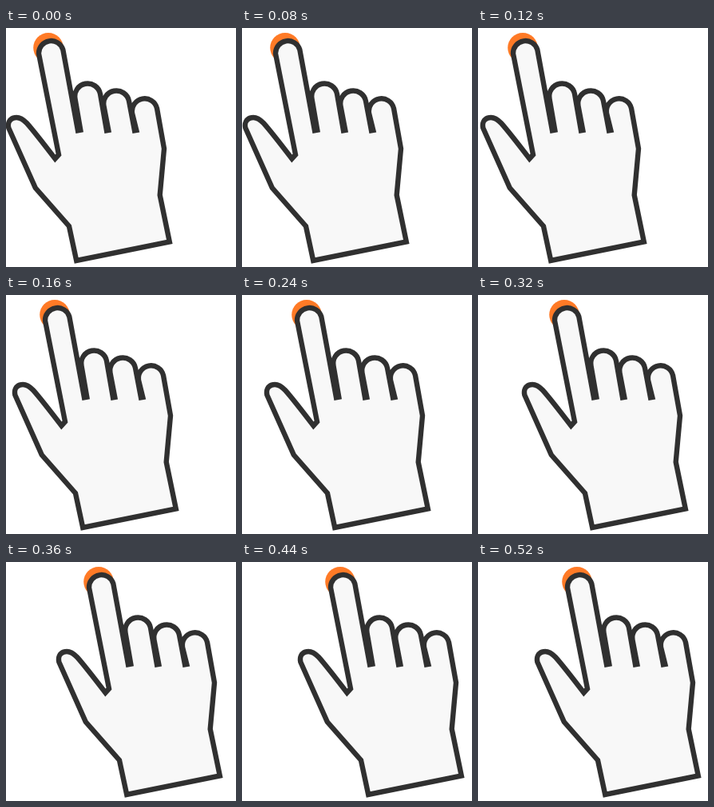
An HTML page for the animation above (560 ms loop, 288 px wide and 299 px high).

```html
<!DOCTYPE html>
<html lang="en">
<head>
<meta charset="utf-8">
<title>Swiping hand</title>
<style>
  html, body { margin: 0; width: 100%; height: 100%; overflow: hidden; background: #fff; }
  svg { display: block; width: 288px; height: 299px; }
  .outline { fill: #f8f8f8; stroke: #303030; stroke-width: 6.4; stroke-linejoin: miter; }
</style>
</head>
<body>
<svg viewBox="0 0 288 299">
  <g id="hand">
    <circle cx="53" cy="24.8" r="18.8" fill="#ff7a26"/>
    <!-- thumb, four fingers, then the palm and wrist -->
    <path class="outline" d="M3.3 125 C0.5 113 14 106 26 119 C35 129 45 142 61.5 163.5 L66 158.5
      L41 32 A15.5 15.5 0 0 1 71.3 27 L90 128.3 L93.3 127.7
      L86.5 88.5 A16 16 0 0 1 118 82.5 L126 128.3 L128.3 127.9
      L122.5 97.5 A16 16 0 0 1 154 91.5 L161 128.3 L163.3 127.9
      L158 106.5 A15.8 15.8 0 0 1 189 100.5
      L198 151 L192.7 209 L204.8 267.5 L88.2 291 L79 248 L36.8 200 Z"/>
  </g>
</svg>
<script>
  const LOOP = 560, STEP = 40, LAST = LOOP / STEP - 1, TRAVEL = 71;
  const hand = document.getElementById('hand');
  const ease = s => s < 0.5 ? 4 * s ** 3 : 1 - 4 * (1 - s) ** 3;

  function draw(now) {
    const step = Math.floor((now % LOOP) / STEP);
    const x = Math.round(TRAVEL * ease(step / LAST));
    hand.setAttribute('transform', `translate(${x} 0)`);
  }

  const start = performance.now();
  function tick() {
    draw(performance.now() - start);
    requestAnimationFrame(tick);
  }
  tick();
</script>
</body>
</html>
```
